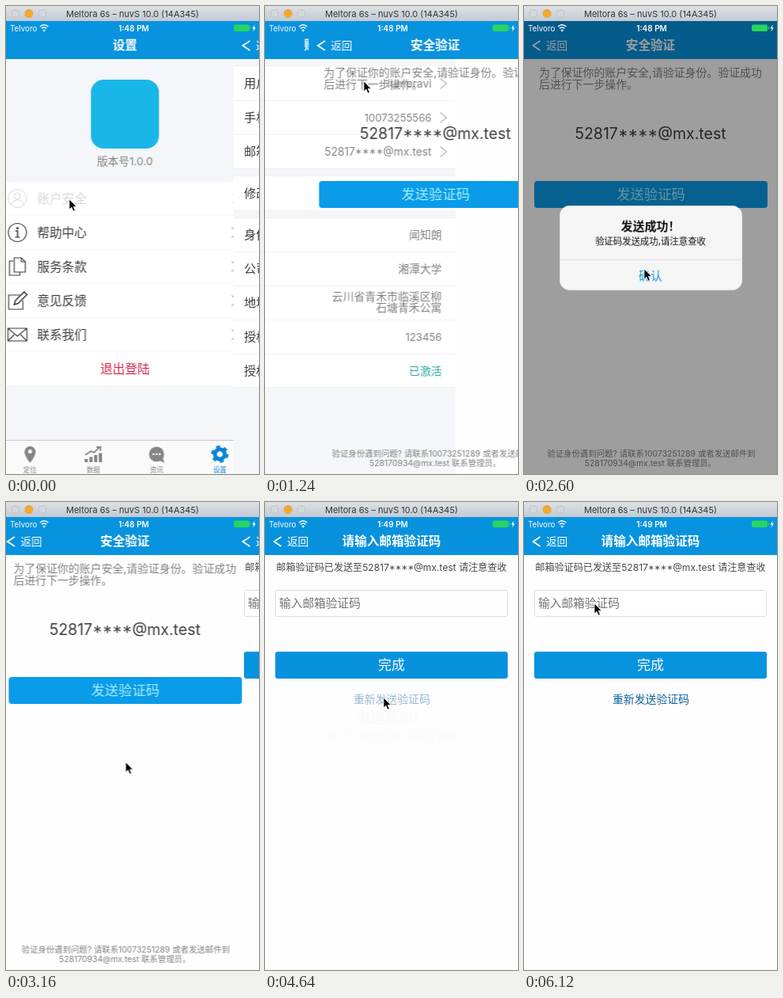
These frames come from a looping animation (320x591 px, 6160 ms). An HTML page:

```html
<!DOCTYPE html>
<html lang="zh">
<head>
<meta charset="utf-8">
<title>账户安全</title>
<style>
html, body { margin: 0; width: 100%; height: 100%; overflow: hidden; background: #fefefe; }
svg { display: block; overflow: hidden; font-family: Inter, "Noto Sans CJK SC", "Noto Sans CJK", sans-serif; }

/* Overdamped spring, already under way on its first visible step */
.page {
  animation: 6160ms infinite;
  animation-timing-function: linear(.1, .1 1%, .31 6%, .5 11%, .74 21%, .834 27.5%, .87 31%, .93 41%, .965 51%, .982 61%, .991 71%, 1);
}
.settings { animation-name: settings; }
.account { animation-name: account; }
.verify { animation-name: verify; }
.code { animation-name: code; }
@keyframes settings {
  0% { transform: translateX(0); opacity: 1; }
  4.87% { transform: translateX(-96px); opacity: 1; }
  4.88%, 100% { transform: translateX(-96px); opacity: 0; }
}
@keyframes account {
  0% { transform: translateX(320px); opacity: 1; }
  4.87%, 18.83% { transform: translateX(0); opacity: 1; }
  23.7% { transform: translateX(-96px); opacity: 1; }
  23.71%, 100% { transform: translateX(-96px); opacity: 0; }
}
@keyframes verify {
  0%, 18.83% { transform: translateX(320px); opacity: 1; }
  23.7%, 51.3% { transform: translateX(0); opacity: 1; }
  56.17% { transform: translateX(-96px); opacity: 1; }
  56.18%, 100% { transform: translateX(-96px); opacity: 0; }
}
@keyframes code {
  0%, 51.3% { transform: translateX(320px); }
  56.17%, 100% { transform: translateX(0); }
}

.row, .send, .resend, .dim, .alert, .before, .after { animation: 6160ms linear infinite; }
.row { animation-name: row; }
.send { animation-name: send; }
.resend { animation-name: resend; }
@keyframes row { 0%, .4% { opacity: .2; } 4%, 100% { opacity: 1; } }
@keyframes send { 0%, 29.7% { opacity: 1; } 30.2% { opacity: .3; } 32.4%, 100% { opacity: 1; } }
@keyframes resend { 0%, 74.4% { opacity: 1; } 74.9% { opacity: .3; } 77.3%, 100% { opacity: 1; } }

.dim { animation-name: dim; }
.alert { animation-name: alert; transform-origin: 160px 306px; }
@keyframes dim {
  0%, 36.9%, 49.7%, 75.3%, 84.7%, 100% { opacity: 0; }
  41.4%, 46.4%, 79.5%, 82.4% { opacity: .38; }
}
@keyframes alert {
  0%, 36.9% { opacity: 0; transform: scale(1.18); animation-timing-function: ease-out; }
  41.4%, 46.4% { opacity: 1; transform: scale(1); }
  49.7% { opacity: 0; transform: scale(1); }
  49.71%, 75.3% { opacity: 0; transform: scale(1.18); animation-timing-function: ease-out; }
  79.5%, 82.4% { opacity: 1; transform: scale(1); }
  84.7%, 100% { opacity: 0; transform: scale(1); }
}

.before { animation-name: before; }
.after { animation-name: after; }
@keyframes before { 0%, 68.1% { opacity: 1; } 68.11%, 100% { opacity: 0; } }
@keyframes after { 0%, 68.1% { opacity: 0; } 68.11%, 100% { opacity: 1; } }

.cursor { animation: cursor 6160ms ease-in-out infinite; }
@keyframes cursor {
  0%, 8.4% { transform: translate(80px, 244px); }
  17.8%, 20.2% { transform: translate(125px, 95px); }
  27.6%, 37% { transform: translate(136px, 229px); }
  41.5%, 50.3% { transform: translate(152px, 332px); }
  59.7%, 62.3% { transform: translate(123px, 177px); }
  70.1%, 76.3% { transform: translate(150px, 247px); }
  81.2%, 82.5% { transform: translate(163px, 333px); }
  85.1% { transform: translate(140px, 238px); }
  91.5%, 95.4% { transform: translate(98px, 165px); }
  99.3%, 100% { transform: translate(89px, 128px); }
}
</style>
</head>
<body>
<svg id="stage" width="320" height="591"></svg>
<script>
const BLUE = '#0893de', BRIGHT = '#0a9ce8', PALE = '#f4f6f9', GREY = '#808080', INK = '#3c3c3c';
const MAIL = '52817****@mx.test';

const rect = (x, y, w, h, fill, more = '') =>
  `<rect x="${x}" y="${y}" width="${w}" height="${h}" fill="${fill}" ${more}/>`;
// x, vertical centre, size, colour, content
const text = (x, y, size, fill, str, anchor = 'middle', weight = 400) =>
  `<text x="${x}" y="${y}" dy=".37em" font-size="${size}" fill="${fill}" text-anchor="${anchor}" font-weight="${weight}">${str}</text>`;
const line = (x, y, w, color = '#f0f1f3') => rect(x, y, w, 1, color);
const path = (d, stroke, width = 1.2, fill = 'none') =>
  `<path d="${d}" fill="${fill}" stroke="${stroke}" stroke-width="${width}"/>`;
const at = (x, y, body) => `<g transform="translate(${x} ${y})">${body}</g>`;
const chevron = (x, y) => path(`M${x} ${y - 6.5}l8 6.5l-8 6.5`, '#b4b4b8', 1.2);
const page = (name, body) => `<g class="page ${name}">${body}</g>`;
const nav = (title, back = true) => rect(0, 19, 320, 48, BLUE) +
  text(160, 49, 15.6, '#fff', title, 'middle', 600) +
  (back ? path('M20.5 44l-9 6l9 6', '#fff', 1.8) + text(28, 50, 13.6, '#fff', '返回', 'start', 500) : '');

function settings() {
  const icons = [
    `<circle r="11.5" fill="none" stroke="${INK}"/><circle cy="-3" r="4" fill="none" stroke="${INK}"/>` + path('M-7.5 8q1-6 7.5-6t7.5 6', INK, 1),
    `<circle r="11.5" fill="none" stroke="${INK}" stroke-width="1.2"/><circle cy="-5.5" r="1.6" fill="${INK}"/>` + path('M-2.5-2h2.8v8', INK, 1.6) + path('M-3 6h6', INK),
    path('M-4-11h9l5 5v13h-14zM5-11v5h5M-5-7h-5v18h13v-4', INK),
    path('M3-7h-14v18h18v-11', INK) + path('M-4 5l1.5-5l11-11l3.5 3.5l-11 11z', INK, 1.6),
    path('M-12-8h24v16h-24zM-12-8l12 10l12-10M-12 8l8-8M12 8l-8-8', INK)
  ];
  const rows = ['账户安全', '帮助中心', '服务条款', '意见反馈', '联系我们'].map((name, i) => {
    const y = 243 + 43 * i;
    return `<g class="${i ? '' : 'row'}">` + at(24, y, icons[i]) +
      text(49, y, 15.7, INK, name, 'start') + chevron(295, y) + '</g>' + line(0, y + 21, 320, '#f6f6f7');
  }).join('');
  const gear = '#0c86d2', dull = '#858585';
  const tabs = [
    `<path d="M0 11q-7-9-7-14a7 7 0 0 1 14 0q0 5-7 14z" fill="${dull}"/><circle cy="-3.5" r="2.6" fill="#fafafa"/>`,
    [-9, -3, 3, 9].map((x, i) => rect(x - 2, 6 - 2.5 * i, 4, 4 + 2.5 * i, dull)).join('') +
      path('M-10 1l7-5l4 2l7-7M4-9h5v5', dull, 1.8),
    `<path d="M4 8l6 3l-2-6z" fill="${dull}"/><circle r="9.5" fill="${dull}"/>` +
      [-4, 0, 4].map(x => `<circle cx="${x}" r="1.3" fill="#fafafa"/>`).join(''),
    `<g fill="none" stroke="${gear}"><circle r="6.2" stroke-width="5"/><circle r="9" stroke-width="4" stroke-dasharray="4.71"/></g>`
  ];
  return rect(0, 19, 320, 572, PALE) + nav('设置', false) +
    rect(117, 93, 86, 87, '#18b7e8', 'rx="16"') +
    text(160, 196, 13.7, GREY, '版本号1.0.0') +
    rect(0, 222, 320, 257, '#fff') + rows + text(160, 458, 15.7, '#d0234f', '退出登陆') +
    rect(0, 549, 320, 42, '#fafafa') + line(0, 548, 320, '#c8c8ca') +
    ['定位', '数据', '资讯', '设置'].map((name, i) =>
      at(40 + 80 * i, 566, tabs[i]) + text(40 + 80 * i, 586, 8.6, i == 3 ? gear : dull, name)).join('');
}

function account() {
  const rows = [
    [97, '用户名', 'lumoravi', 1], [140, '手机号', '10073255566', 1], [183, '邮箱', MAIL, 1],
    [236, '修改密码', '', 1],
    [288, '身份', '闻知朗'], [331, '公司', '湘潭大学'], [374, '地址', ''],
    [417, '授权码', '123456'], [460, '授权状态', '已激活']
  ];
  const group = (y, h) => rect(0, y, 320, h, '#fff') + line(0, y, 320) + line(0, y + h, 320);
  return rect(0, 19, 320, 572, PALE) + nav('账户安全') +
    group(75, 130) + group(214, 44) + group(267, 214) +
    [119, 162, 310, 353, 396, 439].map(y => line(0, y, 320)).join('') +
    rows.map(([y, label, value, link]) =>
      text(13, y, 15.3, INK, label, 'start') +
      text(link ? 290 : 303, y + 1, /^\d+$/.test(value) ? 13.2 : 13.8, value == '已激活' ? '#2aa9a0' : GREY, value, 'end') +
      (link ? chevron(301, y + 1) : '')).join('') +
    text(303, 367, 13.9, GREY, '云川省青禾市临溪区柳', 'end') +
    text(303, 381, 13.9, GREY, '石塘青禾公寓', 'end');
}

// The body of this page is see-through while it slides in
const verify = () => nav('安全验证') +
  text(19, 84, 13.9, GREY, '为了保证你的账户安全,请验证身份。验证成功', 'start') +
  text(19, 99, 13.9, GREY, '后进行下一步操作。', 'start') +
  text(160, 161, 19.5, INK, MAIL) +
  '<g class="send">' + rect(13, 221, 295, 34, BRIGHT, 'rx="4"') +
  text(160.5, 238, 17.3, '#a4f1ff', '发送验证码', 'middle', 300) + '</g>' +
  text(161, 565, 10.4, GREY, '验证身份遇到问题? 请联系10073251289 或者发送邮件到') +
  text(160, 577, 10.4, GREY, '528170934@mx.test 联系管理员。');

const code = () => nav('请输入邮箱验证码') +
  text(160, 83, 12.1, '#484848', `邮箱验证码已发送至${MAIL} 请注意查收`) +
  rect(13.5, 111.5, 293, 33, '#fff', 'rx="2" stroke="#dedede"') +
  text(18, 128, 14.7, '#747474', '输入邮箱验证码', 'start') +
  rect(13, 189, 294, 34, BLUE, 'rx="3"') + text(160, 206, 17, '#fff', '完成') +
  '<g class="resend">' + text(160.5, 249, 13.9, '#11639f', '重新发送验证码') + '</g>';

const alertBox = () => '<g class="alert">' + rect(45, 252, 231, 107, '#f5f5f5', 'rx="13"') +
  text(160, 278, 15, '#111', '发送成功！', 'middle', 600) +
  text(160, 297, 11.4, '#111', '验证码发送成功,请注意查收') +
  line(45, 320, 231, '#dcdcde') + text(160, 341, 15, '#0a97e6', '确认', 'middle', 500) + '</g>';

const status = () => text(5, 28, 9.8, '#fff', 'Telvoro', 'start') +
  path('M43 26q5.2-4.6 10.4 0M45 28.4q3.2-2.8 6.4 0', '#fff', 1.5) +
  '<path d="M48.2 32.5l-1.9-2q1.9-1.6 3.8 0z" fill="#fff"/>' +
  ['48', '49'].map((m, i) =>
    `<g class="${i ? 'after' : 'before'}">` + text(161.5, 28, 10, '#fff', `1:${m} PM`, 'middle', 600) + '</g>').join('') +
  rect(288, 23.5, 20, 8.5, '#27d65f', 'rx="2"') + rect(308.8, 26, 1.4, 3.5, '#27d65f') +
  '<path d="M314.5 23.5l-3 5h2l-1 4l3.5-5.2h-2z" fill="#fff"/>';

const windowBar = () =>
  '<linearGradient id="bar" x2="0" y2="1"><stop stop-color="#dee1e5"/><stop offset="1" stop-color="#c2cad3"/></linearGradient>' +
  rect(0, 0, 320, 19, 'url(#bar)') +
  ['#d3d6da', '#f7a928', '#d3d6da'].map((c, i) =>
    `<circle cx="${12 + 17 * i}" cy="9.5" r="5" fill="${c}" stroke="${i == 1 ? '#e39a22' : '#b9bdc2'}" stroke-width=".8"/>`).join('') +
  text(160, 9.5, 11, '#333', 'Meltora 6s – nuvS 10.0 (14A345)');

document.getElementById('stage').innerHTML =
  rect(0, 0, 320, 591, '#fefefe') + rect(0, 19, 320, 48, BLUE) +
  page('settings', settings()) + page('account', account()) +
  page('verify', verify()) + page('code', code()) +
  '<g class="dim">' + rect(0, 19, 320, 572, '#000') + '</g>' +
  alertBox() + status() + windowBar() +
  '<g class="cursor">' + path('M0 0v13l3-2.8l2.1 5l2.3-1l-2.1-4.8h4z', '#fff', .8, '#000') + '</g>';
</script>
</body>
</html>
```
